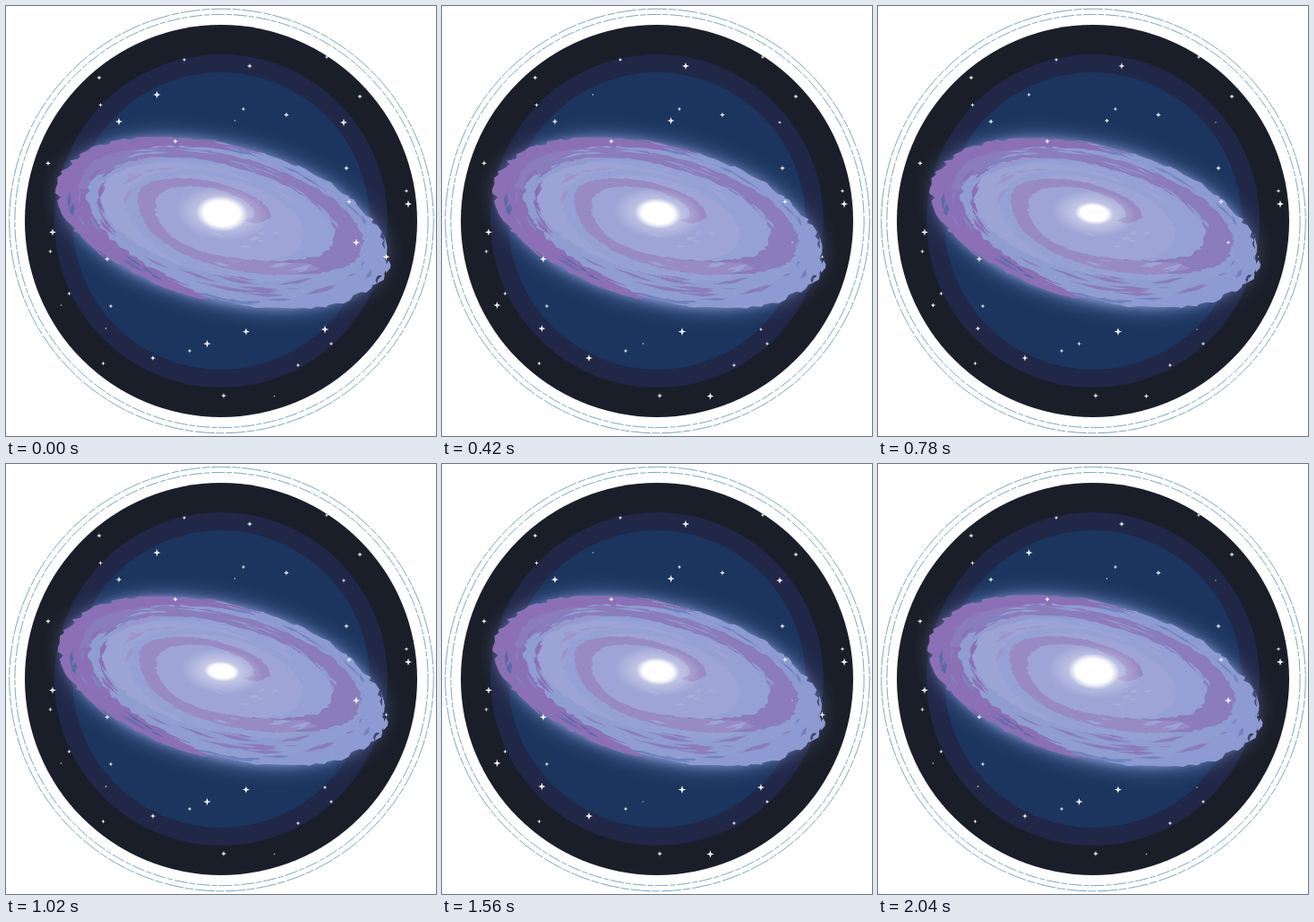
Animation of 480x480 px, one loop 2100 ms. Source, as an HTML page with a canvas:

```html
<!DOCTYPE html>
<html lang="en">
<head>
<meta charset="utf-8">
<title>Spiral galaxy</title>
<style>
html, body { margin: 0; width: 100%; height: 100%; overflow: hidden; background: #fff; }
canvas { display: block; width: 480px; height: 480px; }
</style>
</head>
<body>
<canvas id="stage" width="480" height="480"></canvas>
<script>
const ctx = document.getElementById('stage').getContext('2d');
const LOOP = 2100, STEP = 60, TAU = Math.PI * 2;
const TILT = 14 * Math.PI / 180, CX = 241, CY = 243;

let seed = 77;
function rnd() {
  seed = (seed * 1664525 + 1013904223) % 4294967296;
  return seed / 4294967296;
}
const between = (a, b) => a + (b - a) * rnd();

// Point on the tilted disc: angle in degrees (clockwise), radius 0..1
function at(deg, r) {
  const a = deg * Math.PI / 180;
  const u = 188 * r * Math.cos(a), v = 88 * r * Math.sin(a);
  return [CX + u * Math.cos(TILT) - v * Math.sin(TILT),
          231 + 12 * r + u * Math.sin(TILT) + v * Math.cos(TILT)];
}

// Smooth value of column k along [angle, radius, half width] rows
function sample(rows, deg, k) {
  let i = 0;
  while (i < rows.length - 2 && rows[i + 1][0] < deg) i++;
  const a = rows[i], b = rows[i + 1];
  const p = rows[i - 1] || a, n = rows[i + 2] || b;
  const t = (deg - a[0]) / (b[0] - a[0]);
  const m = (b[k] - p[k]) / 2, q = (n[k] - a[k]) / 2;
  const t2 = t * t, t3 = t2 * t;
  return (2 * t3 - 3 * t2 + 1) * a[k] + (t3 - 2 * t2 + t) * m +
         (3 * t2 - 2 * t3) * b[k] + (t3 - t2) * q;
}

// Band along the disc with torn edges
function ribbon(g, rows, color, rough) {
  const from = rows[0][0], to = rows[rows.length - 1][0];
  g.beginPath();
  for (const side of [1, -1]) {
    let d = 0;
    while (d < to - from) {
      const deg = side > 0 ? from + d : to - d;
      const r = sample(rows, deg, 1) + side * sample(rows, deg, 2) + between(-rough, rough);
      g.lineTo(...at(deg, r));
      d += between(0.8, 4.5);
    }
  }
  g.closePath();
  g.fillStyle = color;
  g.fill();
}

function disc(g, r, color, rough) {
  g.beginPath();
  for (let d = 0; d < 360; d += between(1, 4)) g.lineTo(...at(d, r + between(-rough, rough)));
  g.closePath();
  g.fillStyle = color;
  g.fill();
}

function streaks(g, count, a0, a1, r0, r1, color, size = 1) {
  for (let i = 0; i < count; i++) {
    const a = between(a0, a1), len = between(6, 24) * size, r = between(r0, r1);
    const w = between(0.006, 0.016) * size, drift = between(-0.03, 0.01);
    ribbon(g, [[a, r, 0], [a + len * 0.45, r + drift / 2, w], [a + len, r + drift, 0]], color, 0.004);
  }
}

function paintGalaxy() {
  const c = document.createElement('canvas');
  c.width = c.height = 960;
  const g = c.getContext('2d');
  g.scale(2, 2);

  g.shadowColor = 'rgba(160,178,240,0.85)';
  g.shadowBlur = 56;
  disc(g, 0.95, '#7182bd', 0.01);
  g.shadowBlur = 24;
  disc(g, 0.95, '#7182bd', 0.01);
  g.shadowBlur = 0;

  disc(g, 0.92, '#8f9dd1', 0.015);

  // outer arms
  ribbon(g, [[86, 0.97, 0.015], [110, 0.92, 0.06], [150, 0.9, 0.09], [185, 0.91, 0.09],
    [225, 0.93, 0.075], [252, 0.94, 0.05], [268, 0.94, 0.01]], '#8b70b5', 0.018);
  ribbon(g, [[-100, 0.98, 0.01], [-70, 0.95, 0.05], [-30, 0.93, 0.07], [0, 0.93, 0.07],
    [40, 0.93, 0.07], [66, 0.95, 0.04], [78, 0.97, 0.01]], '#8d9bd2', 0.02);
  streaks(g, 16, 88, 170, 0.84, 1.0, '#8b70b5');
  streaks(g, 14, 205, 260, 0.9, 1.01, '#8b70b5');
  streaks(g, 22, -95, 70, 0.92, 1.02, '#8d9bd2');
  streaks(g, 9, 95, 165, 0.88, 0.97, '#596ba9', 0.8);
  streaks(g, 11, -80, 75, 0.86, 0.96, '#7282bd', 0.8);

  // inner disc, lighter towards the core
  disc(g, 0.7, '#95a1d4', 0.012);
  ribbon(g, [[105, 0.68, 0.02], [150, 0.66, 0.07], [190, 0.66, 0.08], [235, 0.62, 0.05],
    [270, 0.58, 0.01]], '#9ca4d5', 0.012);
  disc(g, 0.5, '#9ea5d6', 0.01);

  // one long purple spiral
  ribbon(g, [[178, 0.86, 0.02], [205, 0.83, 0.06], [235, 0.81, 0.065], [270, 0.77, 0.075],
    [310, 0.79, 0.08], [345, 0.78, 0.085], [370, 0.72, 0.085], [400, 0.6, 0.075],
    [432, 0.54, 0.06]], '#8b7cbb', 0.014);
  ribbon(g, [[385, 0.65, 0.04], [405, 0.59, 0.07], [430, 0.54, 0.07], [470, 0.52, 0.05],
    [525, 0.46, 0.05], [560, 0.46, 0.06], [620, 0.37, 0.05], [660, 0.32, 0.055],
    [690, 0.27, 0.055], [722, 0.17, 0.03]], '#988bc5', 0.008);

  // torn detail between the arms
  streaks(g, 12, 30, 110, 0.69, 0.85, '#8b7cbb', 1.2);
  streaks(g, 9, 125, 200, 0.74, 0.84, '#8b70b5');
  streaks(g, 9, 135, 225, 0.58, 0.75, '#9e94cb');
  streaks(g, 12, 185, 330, 0.7, 0.86, '#909dd2');
  streaks(g, 7, 140, 210, 0.8, 0.94, '#7f83c1');
  streaks(g, 8, -50, 50, 0.8, 0.9, '#8b7cbb');
  streaks(g, 8, 10, 85, 0.48, 0.66, '#9ba4d6');
  streaks(g, 7, 240, 330, 0.45, 0.65, '#a3a4d5');
  streaks(g, 7, -20, 80, 0.25, 0.42, '#a9aeda');
  return c;
}

const galaxy = paintGalaxy();

function star(x, y, r) {
  const k = r * 0.24;
  ctx.beginPath();
  for (let i = 0; i < 8; i++) {
    const a = i * TAU / 8, d = i % 2 ? k * 1.4 : r;
    ctx.lineTo(x + d * Math.cos(a), y + d * Math.sin(a));
  }
  ctx.closePath();
  ctx.fillStyle = '#fff';
  ctx.fill();
}

const steady = [
  [199, 60, 2.5], [358, 57, 2.5], [395, 101, 2.8], [104, 80, 2.8], [105.5, 110.5, 2.5],
  [265, 115, 2.4], [313, 121.5, 3], [189, 151, 3], [380, 181, 3], [47, 175.5, 3],
  [383, 218.5, 2.8], [447, 206.5, 2.6], [449, 221, 4.2], [52, 252.5, 4], [49.5, 274, 2.6],
  [70.5, 321, 2.5], [117, 335, 2.6], [205, 385, 2.5], [108.5, 399, 2.5], [326, 401, 2.6],
  [363, 377, 2.5], [243, 435, 3]
];
// [x, y, radius at start, radius half a period later]
const quick = [
  [168.5, 99, 4.2, 1], [391, 264, 4.2, 1], [224.5, 377, 4.2, 1],
  [272, 67, 3, 4.2], [255.5, 128, 1.2, 4.2], [61.5, 334, 1.2, 4.2],
  [111.5, 360, 1.4, 4.2], [299.5, 435.5, 1.2, 4.2], [164, 393, 3, 4.2],
  [113, 282.5, 3, 4], [268, 363.5, 4, 4.5]
];
const slow = [
  [377, 130, 4.2, 1], [356, 361, 4.4, 1], [424.5, 280, 4, 1], [126, 129, 4.2, 3]
];

function twinkle(list, t, period) {
  const w = (1 + Math.cos(TAU * t / period)) / 2;
  for (const [x, y, a, b] of list) star(x, y, b + (a - b) * w);
}

function circle(r, color) {
  ctx.beginPath();
  ctx.arc(240, 240, r, 0, TAU);
  ctx.fillStyle = color;
  ctx.fill();
}

function ring(r, dash) {
  ctx.beginPath();
  ctx.arc(240.5, 240, r, 0, TAU);
  ctx.setLineDash(dash);
  ctx.strokeStyle = '#6c9db6';
  ctx.lineWidth = 0.9;
  ctx.stroke();
  ctx.setLineDash([]);
}

function glow(rx, ry, stops) {
  ctx.save();
  ctx.translate(241, 231.5);
  ctx.rotate(0.1);
  ctx.scale(rx, ry);
  const f = ctx.createRadialGradient(0, 0, 0, 0, 0, 1);
  for (const [p, alpha] of stops) f.addColorStop(p, `rgba(255,255,255,${alpha})`);
  ctx.fillStyle = f;
  ctx.fillRect(-1, -1, 2, 2);
  ctx.restore();
}

function draw(t) {
  const pulse = (1 + Math.cos(TAU * t / LOOP)) / 2;
  ctx.fillStyle = '#fff';
  ctx.fillRect(0, 0, 480, 480);
  ring(236.8, [22, 2, 9, 1.5]);
  ring(230.6, [15, 2, 6, 2]);
  circle(219, '#1a1e29');
  circle(186, '#202747');
  circle(166, '#1b355e');

  ctx.save();
  ctx.translate(CX, CY);
  const s = 0.985 + 0.015 * pulse;
  ctx.scale(s, s);
  ctx.drawImage(galaxy, -CX, -CY, 480, 480);
  ctx.restore();

  glow(46 + 6 * pulse, 25 + 5 * pulse, [[0, 0.6], [0.4, 0.42], [1, 0]]);
  glow(20 + 9 * pulse, 11 + 9 * pulse, [[0, 1], [0.68, 1], [1, 0]]);

  for (const st of steady) star(...st);
  twinkle(quick, t, LOOP / 2);
  twinkle(slow, t, 1400);
}

const start = performance.now();
function tick() {
  const t = (performance.now() - start) % LOOP;
  draw(Math.floor(t / STEP) * STEP);
  requestAnimationFrame(tick);
}
tick();
</script>
</body>
</html>
```
